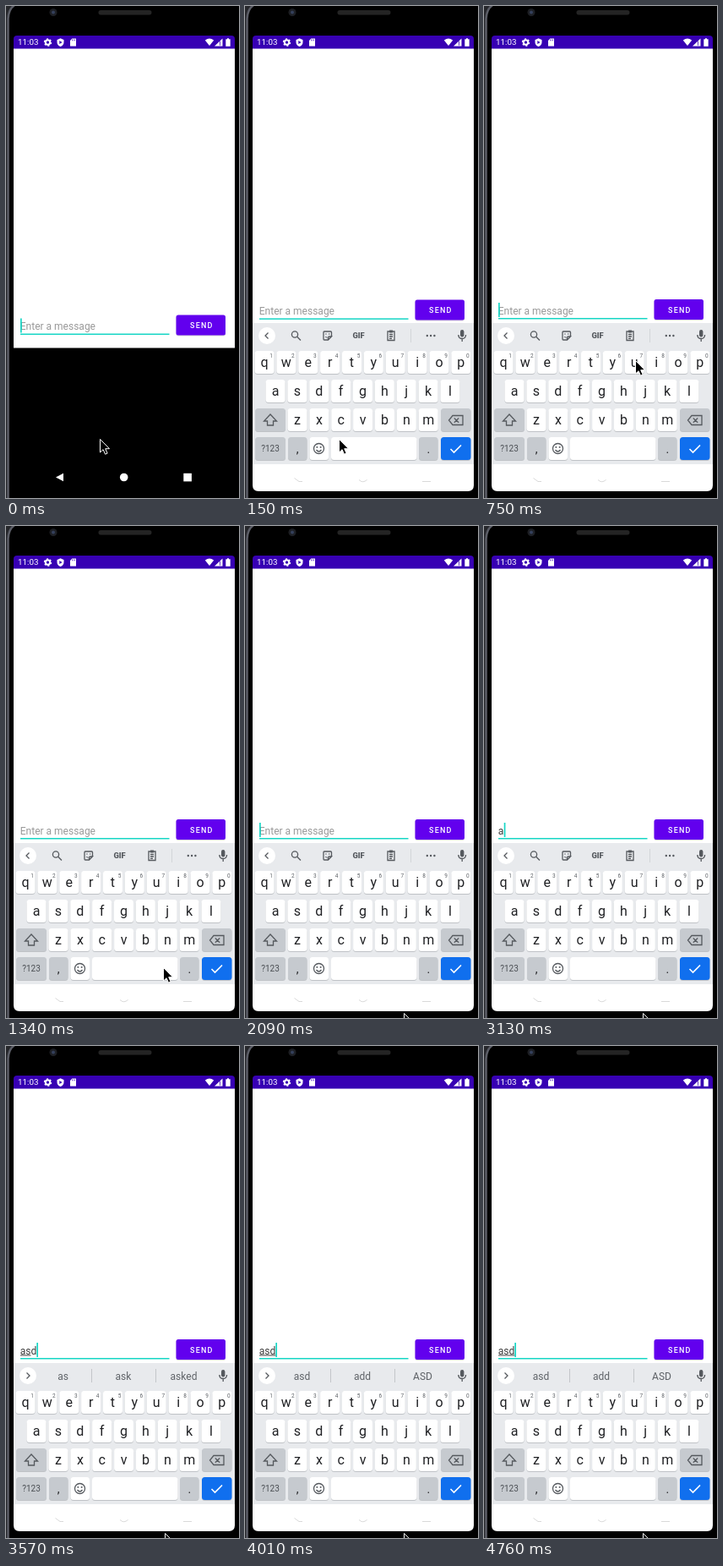
Recreate the animation shown at these times as an HTML page. Size 276 px wide and 582 px high, loop 5.06 s.

```html
<!DOCTYPE html>
<html lang="en">
<head>
<meta charset="utf-8">
<title>Message input</title>
<style>
html, body { margin: 0; width: 100%; height: 100%; overflow: hidden; background: #000; }
svg { display: block; width: 276px; height: 582px; font-family: Roboto, sans-serif; }
.line { fill: none; stroke: #55595e; stroke-width: 1.3; }
.mid { text-anchor: middle; }
.grey { fill: #55595e; }
</style>
</head>
<body>
<svg viewBox="0 0 276 582">
  <rect width="276" height="582"/>
  <path d="M0 0H9Q2 5 2 15V582H0Z" fill="#25262a"/>
  <path d="M10 -1Q3 4 2.500 15V582" fill="none" stroke="#5a5c65" stroke-width="2.600"/>
  <circle cx="56" cy="7.500" r="4.500" fill="#1d1f24"/>
  <circle cx="56" cy="7.500" r="2" fill="#34405c"/>
  <rect x="109.500" y="5" width="63" height="5.500" rx="2.700" fill="#242424"/>

  <path d="M9 51V39Q9 35 13 35H267Q271 35 271 39V51Z" fill="#3700b3"/>
  <path id="page" fill="#fff"/>
  <g fill="#fff">
    <text x="14" y="46.200" font-size="9.800">11:03</text>
    <circle cx="49.500" cy="43" r="2.700" fill="none" stroke="#fff" stroke-width="2"/>
    <circle cx="49.500" cy="43" r="4" fill="none" stroke="#fff" stroke-width="1.400" stroke-dasharray="2.100 2.090"/>
    <path d="M64.500 38.300L68.500 40V43Q68.300 46.500 64.500 48Q60.700 46.500 60.500 43V40Z"/>
    <path d="M63.300 41L66.600 43L63.300 45Z" fill="#3700b3"/>
    <path d="M78.300 38.500H83V47.500H76V41Z"/>
    <path d="M78.500 39.500V41.300M80 39.500V41.300M81.500 39.500V41.300" stroke="#3700b3" stroke-width=".6"/>
    <path d="M235.800 40.500Q241 36.500 246.200 40.500L241 47Z"/>
    <path d="M247 47.500L256.500 38.500V47.500Z"/>
    <path d="M253.500 41.500V46.700" stroke="#3700b3" stroke-width=".8"/>
    <path d="M262 38.300H264V39.300H265.700V47.700H260.300V39.300H262Z"/>
  </g>

  <g id="nav" fill="#fff">
    <path d="M59 557.500L68 552.700V562.300Z"/>
    <circle cx="139.700" cy="557.500" r="4.800"/>
    <rect x="210.300" y="552.800" width="9.600" height="9.600"/>
  </g>

  <g id="board">
    <rect x="9" y="375" width="262" height="167" fill="#e8eaed"/>
    <path d="M58.500 558.500L64 562.500H68M135 560.500Q139.500 565 144.500 560.500M210 562.500H220" fill="none" stroke="#d9d9d9"/>
    <circle cx="26" cy="390" r="10" fill="#fff"/>
    <path id="chevron" class="line"/>
    <g id="tools">
      <circle class="line" cx="59" cy="388.500" r="3.600"/>
      <path class="line" d="M61.700 391.200L66 395.500"/>
      <path class="line" d="M102.500 390.500V386Q102.500 385 101.500 385H94Q93 385 93 386V394Q93 395 94 395H98.500L102.500 391H100Q98.500 391 98.500 392.500V395"/>
      <path class="line" d="M95.300 388H96.500M99 388H100.300M95.300 391Q96 392.300 97.500 392" stroke-opacity=".8"/>
      <text class="mid grey" x="134.500" y="393.200" font-size="9.300" font-weight="900">GIF</text>
      <path class="line" d="M169 385H177V395.500H169ZM171 388.500H175M171 391H175M171 393.300H174"/>
      <path class="grey" d="M171 383.500H175V386.500H171Z"/>
      <path d="M196.500 382V398" stroke="#d2d5d9"/>
      <path d="M215.800 390H224.500" fill="none" stroke="#55595e" stroke-width="2.400" stroke-linecap="round" stroke-dasharray="0 4.300"/>
    </g>
    <g id="hints" class="mid" font-size="12" fill="#5f6368">
      <path d="M101.500 382V398M177.500 382V398" stroke="#c3c6ca"/>
      <text x="67.500" y="395"></text>
      <text x="139" y="395"></text>
      <text x="210.500" y="395"></text>
    </g>
    <rect class="grey" x="255" y="383" width="4.400" height="8.500" rx="2.200"/>
    <path class="line" d="M252.800 389Q253 393.500 257.200 393.500Q261.400 393.500 261.600 389M257.200 393.500V397"/>
    <g id="keys" class="mid"></g>
    <path class="line" d="M30 483L22.500 491H26.500V496H33.500V491H37.500Z"/>
    <path class="line" d="M246 484.500H258V495.500H246L241.500 490ZM247.800 487.500L253.200 492.700M253.200 487.500L247.800 492.700"/>
    <circle class="line" cx="87.500" cy="523.500" r="6"/>
    <path class="line" d="M84.500 525Q87.500 529 90.500 525"/>
    <path class="grey" d="M84.500 521H86.200V522.700H84.500ZM88.800 521H90.500V522.700H88.800Z"/>
    <path d="M243.500 524L247.500 528L256 519.500" fill="none" stroke="#fff" stroke-width="1.600"/>
  </g>

  <g id="row">
    <text id="msg" x="16.800" y="364.500" font-size="12"></text>
    <path id="mark" stroke="#444"/>
    <rect x="17" y="369" width="176.500" height="1.500" fill="#16d6c5"/>
    <rect id="caret" y="351" width="1.700" height="17" fill="#16d6c5"/>
    <rect x="201.500" y="348" width="58.500" height="24" rx="2.500" fill="#000" opacity=".15"/>
    <rect x="201.500" y="347" width="58.500" height="24" rx="2.500" fill="#6200ee"/>
    <text class="mid" x="231.800" y="362.600" font-size="9" font-weight="500" letter-spacing="1.150" fill="#fff">SEND</text>
  </g>
  <path id="mouse" d="M0 0V15.500L3.600 12.200L6 17.700L8.600 16.600L6.200 11.200H11Z" stroke="#fff"/>
</svg>
<script>
const $ = id => document.getElementById(id);
const LOOP = 5060;

// Keyboard
let keys = '';
function key(x, y, w, label = '', fill = '#fff', size = 16, ink = '#202124') {
  const box = (dy, c) => `<rect x="${x}" y="${y + dy}" width="${w}" height="27" rx="3.5" fill="${c}"/>`;
  keys += box(1, '#bfc2c6') + box(0, fill) +
    `<text x="${x + w / 2}" y="${y + (size > 12 ? 18.5 : 17)}" font-size="${size}" fill="${ink}">${label}</text>`;
}
['qwertyuiop', 'asdfghjkl', 'zxcvbnm'].forEach((letters, r) => {
  [...letters].forEach((c, i) => {
    const mid = [23, 36, 62][r] + i * 25.87;
    key(mid - 11.5, 408 + r * 34, 23, c);
    if (!r) keys += `<text x="${mid + 8}" y="416" font-size="6.5" fill="#5f6368">${(i + 1) % 10}</text>`;
  });
});
const dark = '#c6cacf';
key(12, 476, 36, '', dark);
key(232, 476, 35.5, '', dark);
key(12, 510, 36, '?123', dark, 10, '#4b4f54');
key(51, 510, 22.5, ',', dark, 14);
key(76.5, 510, 22.5);
key(102, 510, 101.5);
key(206, 510, 22.5, '.', dark, 14);
key(232, 510, 35.5, '', '#106fee');
$('keys').innerHTML = keys;

// Each entry: start time, then the values held from that time on
const pointer = [[0, 111, 512], [600, 155, 453], [750, 179, 419], [1050, 186, 303],
  [1190, 195, 336], [1340, 186, 522], [1490, 185, 528], [1640, 185, 530],
  [1790, 184, 556], [1940, 185, 567], [2090, 188, 576]];
const blink = [[0, 1], [150, 0], [750, 1], [1190, 0], [1640, 1], [2240, 0], [2680, 1], [4160, 0], [4760, 1]];
const typed = [[0, '', 17], [3130, 'a', 23.7], [3270, 'as', 30], [3420, 'asd', 36.3]];
const marks = [[0, 17], [3270, 23.5], [3420, 29.5], [3720, 36.5]];
const hints = [[0], [3270, 'a', 'and', 'at'], [3570, 'as', 'ask', 'asked'], [3720, 'asd', 'add', 'ASD']];
const shift = [[0, 18.5], [150, 0.4], [300, 0]];
const at = (list, t) => list.filter(e => e[0] <= t).pop().slice(1);
const show = (id, on) => $(id).style.display = on ? '' : 'none';
const words = document.querySelectorAll('#hints text');

function draw(t) {
  const open = t >= 150;
  show('board', open);
  show('nav', !open);
  $('page').setAttribute('d', open ? 'M9 50.500H271V567Q271 574 264 574H16Q9 574 9 567Z' : 'M9 50.500H271V404.500H9Z');
  $('row').setAttribute('transform', `translate(0 ${at(shift, t)[0]})`);

  const [text, end] = at(typed, t);
  $('msg').textContent = text || 'Enter a message';
  $('msg').setAttribute('fill', text ? '#3c3c3c' : '#999');
  $('mark').setAttribute('d', `M17 366H${at(marks, t)[0]}`);
  $('caret').setAttribute('x', end);
  show('caret', at(blink, t)[0]);

  const list = at(hints, t), hinting = list.length > 0;
  show('tools', !hinting);
  show('hints', hinting);
  words.forEach((w, i) => w.textContent = list[i] || '');
  $('chevron').setAttribute('d', hinting ? 'M24.500 386.500L28 390L24.500 393.500' : 'M27.500 386.500L24 390L27.500 393.500');

  const [x, y] = at(pointer, t);
  $('mouse').setAttribute('transform', `translate(${x + 0.5} ${y + 0.5})`);
}

const start = performance.now();
function tick() {
  draw((performance.now() - start) % LOOP);
  requestAnimationFrame(tick);
}
tick();
</script>
</body>
</html>
```
